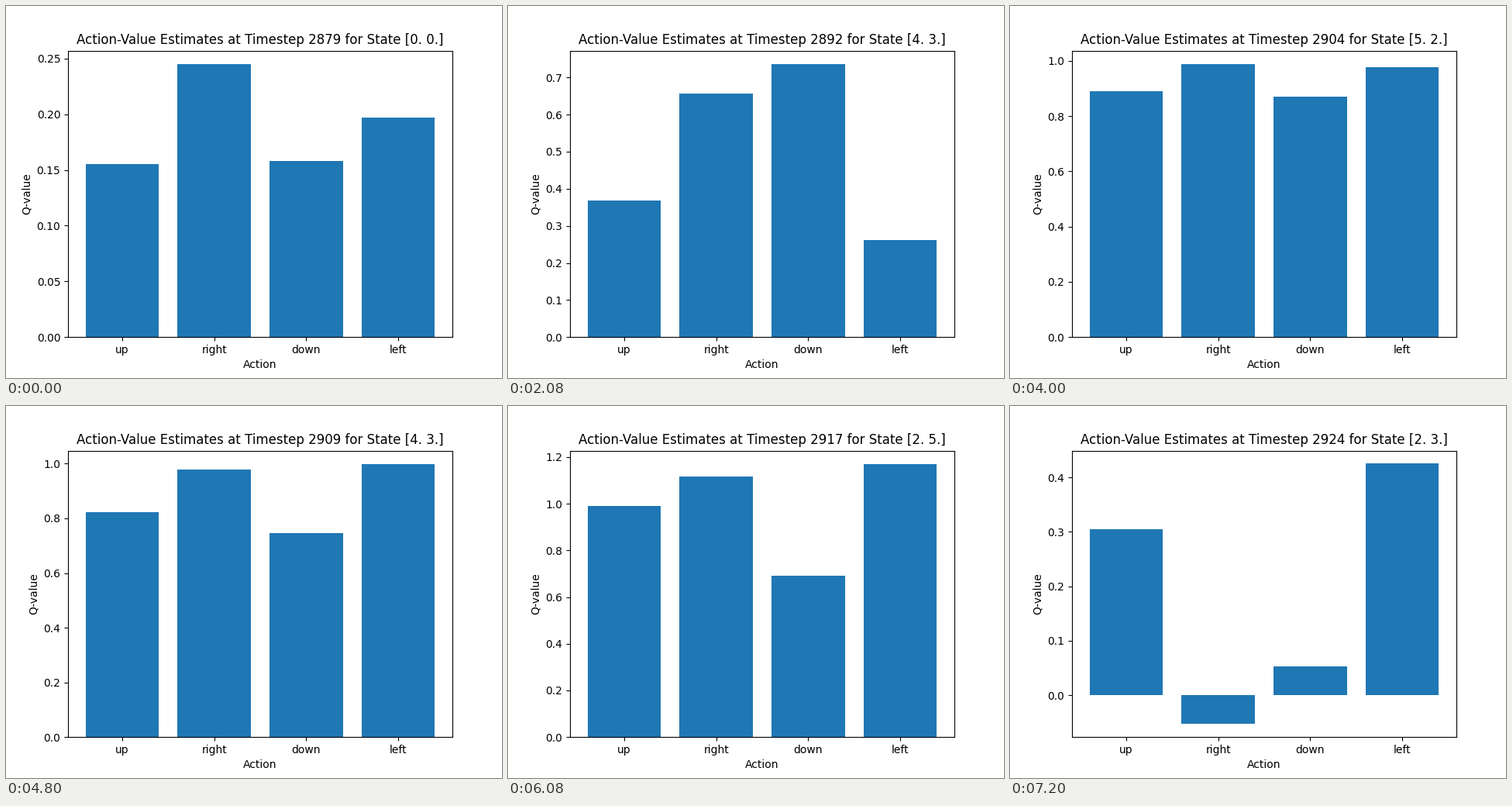
Recreate the animation shown at these times as a matplotlib script. Size 640 px wide and 480 px high, loop 7360 ms.

```python
import numpy as np
import matplotlib.pyplot as plt
from matplotlib.animation import FuncAnimation

ACTIONS = ["up", "right", "down", "left"]
FIRST_STEP = 2879
STEPS = 46
STEP_MS = 160

# Key points of the walk: step -> (grid cell, Q-values in the order of ACTIONS)
KEYS = {
    0: ((0, 0), (0.155, 0.2448, 0.158, 0.197)),
    7: ((4, 1), (0.626, 0.921, 0.613, 0.715)),
    13: ((4, 3), (0.368, 0.657, 0.7357, 0.262)),
    25: ((5, 2), (0.890, 0.9874, 0.870, 0.977)),
    33: ((4, 4), (0.781, 0.971, 0.672, 1.0103)),
    38: ((2, 5), (0.991, 1.116, 0.692, 1.1694)),
    45: ((2, 3), (0.305, -0.053, 0.053, 0.4253)),
}
KEY_STEPS = list(KEYS)
CELLS, VALUES = (np.array(part, float) for part in zip(*KEYS.values()))


def at(step, points):
    """Glide evenly from one key point to the next."""
    return np.array([np.interp(step, KEY_STEPS, column) for column in points.T])


fig, ax = plt.subplots(figsize=(6.4, 4.8), dpi=100)


def draw(i):
    state = np.round(at(i, CELLS))
    ax.clear()
    ax.bar(ACTIONS, at(i, VALUES), color="#1f77b4")
    ax.set_title(f"Action-Value Estimates at Timestep {FIRST_STEP + i} for State {state}")
    ax.set_xlabel("Action")
    ax.set_ylabel("Q-value")


anim = FuncAnimation(fig, draw, frames=STEPS, interval=STEP_MS,
                     init_func=lambda: None, repeat=True, repeat_delay=0)
plt.show()
```
